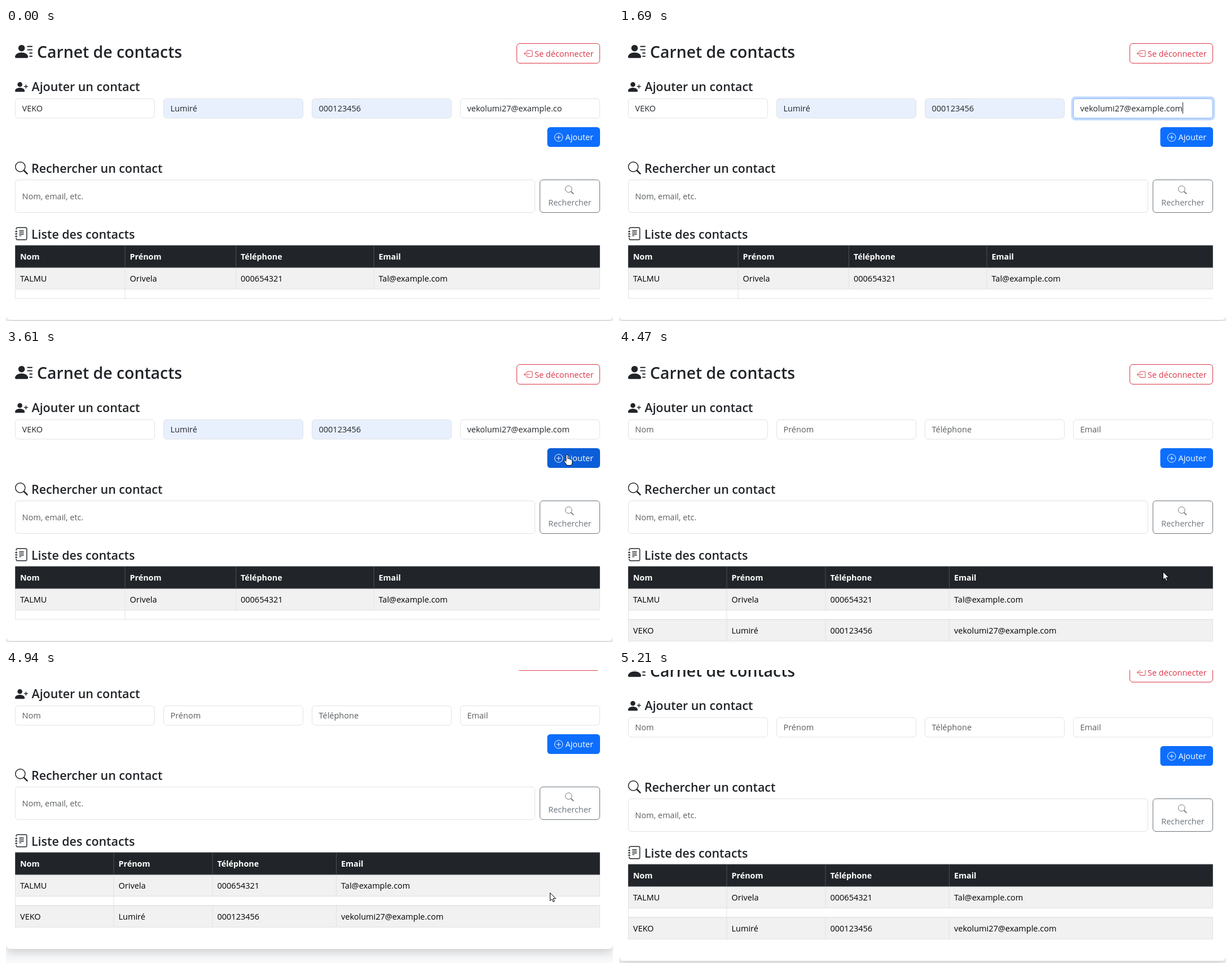
An HTML page that plays this animation: 1076x520 px, repeating every 6070 ms.

```html
<!DOCTYPE html>
<html lang="fr">
<head>
<meta charset="utf-8">
<title>Carnet de contacts</title>
<style>
html, body { margin: 0; width: 100%; height: 100%; overflow: hidden; background: #f8f9fa; }
#stage { position: relative; width: 100%; height: 100%; overflow: hidden; contain: strict; }
#page { position: absolute; left: 0; top: 0; width: 1076px; height: 520px; }
#card { position: absolute; left: 0; top: -20px; width: 1076px; background: #fff;
  border-radius: 0 0 8px 8px; box-shadow: 0 7.7px 15.4px rgba(0, 0, 0, .15); }
svg { position: absolute; left: 0; top: 0; }
#view { overflow: visible; }
text { font: 14.5px "Open Sans", "Noto Sans", sans-serif; fill: #212529; }
.h1 { font-size: 28.4px; font-weight: 600; }
.h2 { font-size: 21.4px; font-weight: 600; }
.th { font-size: 14.3px; font-weight: 700; fill: #fff; }
.td { fill: #000; }
.hint { fill: #595c5f; }
.box { fill: #fff; stroke: #dee2e6; }
.line { fill: none; stroke: currentColor; }
.cursor { stroke: #000; stroke-linejoin: round; fill: #fff; }
</style>
</head>
<body>
<div id="stage">
  <div id="page">
    <div id="card"></div>
    <svg id="view" width="1076" height="520"></svg>
  </div>
  <svg width="1076" height="520">
    <path id="arrow" class="cursor" d="M0 0v14l3.3-3 2.2 5 2.2-1-2.2-4.8h4.6z"/>
    <path id="hand" class="cursor" d="M-1.7 11V1.6a1.6 1.6 0 0 1 3.2 0V7q3-.6 3.2 1 2.3-.5 2.6 1 2-.3 2 1.8V14q0 3-2 5H0q-2-3.5-5-6.5-1-2 .8-2.2 1.3 0 2.5 1.7z"/>
    <path id="beam" class="cursor" style="fill:none" d="M-3.5 .5H-1l1 1 1-1h2.5M0 1.5v11M-3.5 13.5H-1l1-1 1 1h2.5"/>
  </svg>
</div>
<script>
const LOOP = 6070, ADDED = 3680;
const $ = id => document.getElementById(id);
const fieldX = [16.5, 279.5, 542.5, 805.5];
const labels = ['Nom', 'Prénom', 'Téléphone', 'Email'];
const first = ['TALMU', 'Orivela', '000654321', 'Tal@example.com'];
const second = ['VEKO', 'Lumiré', '000123456', 'vekolumi27@example.com'];

const glyphs = {
  person: '<path d="M6 8a3 3 0 1 0 0-6 3 3 0 0 0 0 6m-5 6s-1 0-1-1 1-4 6-4 6 3 6 4-1 1-1 1z"/>',
  lines: '<path class="line" stroke-linecap="round" d="M11.5 3.5h4m-4 3h4m-2 3h2m-2 3h2"/>',
  plus: '<path class="line" stroke-linecap="round" d="M13.5 5.5v4m-2-2h4"/>',
  search: '<circle class="line" cx="6.5" cy="6.5" r="6"/><path class="line" stroke-width="1.8" stroke-linecap="round" d="M11.3 11.3l3.7 3.7"/>',
  journal: '<path class="line" d="M1.5 3V2A1.5 1.5 0 0 1 3 .5h10A1.5 1.5 0 0 1 14.5 2v12a1.5 1.5 0 0 1-1.5 1.5H3A1.5 1.5 0 0 1 1.5 14v-1"/>' +
    '<path class="line" stroke-linecap="round" d="M.5 5.5h2m-2 3h2m-2 3h2M1.5 4.5v1m0 2v1m0 2v1M5.5 4.5h5m-5 2h5m-5 2h5m-5 2h2"/>',
  leave: '<path class="line" stroke-linecap="round" stroke-linejoin="round" d="M5.5 5.5v-2a1 1 0 0 1 1-1h8a1 1 0 0 1 1 1v9a1 1 0 0 1-1 1h-8a1 1 0 0 1-1-1v-2M10.5 8H.5M3.5 5l-3 3 3 3"/>',
  add: '<circle class="line" cx="8" cy="8" r="7.5"/><path class="line" stroke-linecap="round" d="M8 4.5v7M4.5 8h7"/>'
};
const icon = (names, x, y, size, color = '#212529') =>
  `<g transform="translate(${x} ${y}) scale(${size / 16})" style="color:${color}" fill="${color}">` +
  names.split(' ').map(n => glyphs[n]).join('') + '</g>';
const text = (x, y, s, attrs = '') => `<text x="${x}" y="${y}" ${attrs}>${s}</text>`;
const box = (x, y, w, h, attrs = 'class="box"') =>
  `<rect x="${x}" y="${y}" width="${w}" height="${h}" rx="5.5" ${attrs}/>`;

function fields(values) {
  return fieldX.map((x, i) => {
    const filled = values && (i === 1 || i === 2);
    const emailId = values && i === 3 ? 'id="email"' : '';
    return box(x, 125.5, 247, 34.5, `class="box" ${filled ? 'style="fill:#e8f0fe"' : ''}`) +
      text(x + 12, 148, (values || labels)[i], values ? emailId : 'class="hint"');
  }).join('');
}

function table(cols, rows) {
  const row = (y, cells) =>
    `<path d="M16.5 ${y}H1052.5v38.5H16.5z" fill="#f1f1f1" stroke="#dee2e6"/>` +
    cols.map((x, i) => (i ? `<path d="M${x} ${y}v38.5" stroke="#dee2e6"/>` : '') +
      text(x + 8.5, y + 25, cells[i], 'class="td"')).join('');
  return row(425, rows[0]) + (rows[1] ? row(480, rows[1]) : '') +
    `<path class="line" style="color:#dee2e6" d="M16.5 464v16M${cols[1]} 464v16M16 480H1053"/>` +
    '<path d="M16.5 386H1052.5V425H16.5z" fill="#212529" stroke="#4d5154"/>' +
    cols.map((x, i) => (i ? `<path d="M${x} 386v39" stroke="#4d5154"/>` : '') +
      text(x + 8.5, 411, labels[i], 'class="th"')).join('');
}

$('view').innerHTML =
  icon('person lines', 16, 26, 31) + text(55, 53, 'Carnet de contacts', 'class="h1"') +
  box(905.5, 27.5, 147, 35, 'fill="#fff" stroke="#dc3545"') +
  icon('leave', 918, 37.5, 15.4, '#dc3545') + text(937, 50.5, 'Se déconnecter', 'style="fill:#dc3545"') +
  icon('person plus', 16, 93, 23) + text(45.5, 112, 'Ajouter un contact', 'class="h2"') +
  icon('search', 16, 237, 23) + text(45, 257, 'Rechercher un contact', 'class="h2"') +
  icon('journal', 16, 353.5, 23) + text(45, 373.5, 'Liste des contacts', 'class="h2"') +
  box(16.5, 269.5, 921, 58) + text(28.5, 304, 'Nom, email, etc.', 'class="hint"') +
  box(946.5, 269.5, 106, 58, 'id="searchBox" stroke="#6c757d"') +
  `<g id="searchLabel">${icon('search', 991, 279.5, 15.6, 'currentColor')}` +
  text(999.5, 315, 'Rechercher', 'text-anchor="middle" style="fill:currentColor"') + '</g>' +
  box(959.5, 176, 93.5, 35, 'id="addBox"') +
  icon('add', 972, 186.3, 15.4, '#fff') + text(991.5, 199, 'Ajouter', 'style="fill:#fff"') +
  `<g id="before">${fields(second)}` +
  '<g id="focus">' + box(803.5, 123.5, 251, 38.5, 'fill="none" stroke="#0d6efd" stroke-opacity=".25" stroke-width="4"') +
  box(805.5, 125.5, 247, 34.5, 'fill="none" stroke="#86b7fe"') + '</g>' +
  '<path id="caret" stroke="#212529" d="M.5 132v20"/>' +
  table([16.5, 211, 407.5, 652], [first]) + '</g>' +
  `<g id="after">${fields(null)}${table([16.5, 191, 366, 585.5], [first, second])}</g>`;

// Pointer and scroll hold each pose until the next time.
const pointer = [
  [0], [70, 'hand', 1004, 300], [140, 'hand', 1001, 272], [200, 'arrow', 999, 235],
  [270, 'hand', 997, 195], [330, 'arrow', 996, 167], [400, 'beam', 995.5, 152], [460, 'beam', 995.5, 149.5],
  [1140], [2220, 'beam', 995.5, 149.5], [2420, 'beam', 995, 153], [2490, 'arrow', 994, 165],
  [2570, 'hand', 993, 177], [2640, 'hand', 993, 180], [2710, 'hand', 994, 183],
  [2780, 'hand', 994, 185], [2850, 'hand', 994.5, 187.5], [4200, 'hand', 992, 199],
  [4270, 'hand', 980, 275], [4330, 'arrow', 971, 335], [4400, 'arrow', 966, 375],
  [4470, 'arrow', 964.5, 395.5], [5140]
];
const scroll = [[0, 0], [4800, 22], [4870, 50], [4940, 62], [5010, 59], [5070, 52], [5140, 45], [5210, 41]];
const poseAt = (poses, t) => poses.filter(p => p[0] <= t).pop();
const clamp = v => Math.min(1, Math.max(0, v));
const fade = (t, on, off) => clamp((t - on) / 150) - clamp((t - off) / 150);
const within = (t, a, b) => t >= a && t < b;
const show = (id, on) => { $(id).style.display = on ? '' : 'none'; };
const mix = (a, b, k) => `rgb(${a.map((v, i) => Math.round(v + (b[i] - v) * k))})`;

function render(t) {
  const added = t >= ADDED;
  show('before', !added);
  show('after', added);
  $('card').style.height = (added ? 577 : 538) + 'px';
  $('page').style.transform = `translateY(${-poseAt(scroll, t)[1]}px)`;

  const typed = t >= 1690;
  const address = typed ? second[3] : second[3].slice(0, -1);
  if ($('email').textContent !== address) $('email').textContent = address;
  $('focus').style.opacity = fade(t, 930, 3120);
  const caretOn = within(t, 990, 1490) || within(t, 1690, 2220) || within(t, 2750, 3120);
  show('caret', caretOn);
  if (caretOn) {
    const end = 817.5 + $('email').getComputedTextLength();
    $('caret').setAttribute('transform', `translate(${Math.round(end)} 0)`);
  }

  const searchHover = fade(t, 70, 200) + fade(t, 4250, 4320);
  $('searchBox').setAttribute('fill', mix([255, 255, 255], [108, 117, 125], searchHover));
  $('searchLabel').style.color = mix([108, 117, 125], [255, 255, 255], searchHover);
  const addHover = fade(t, 270, 330) + fade(t, 2570, 4250) + .35 * fade(t, 3120, 3310);
  $('addBox').setAttribute('fill', mix([13, 110, 253], [11, 94, 215], addHover));

  const [, shape, x, y] = poseAt(pointer, t);
  for (const id of ['arrow', 'hand', 'beam']) show(id, id === shape);
  if (shape) $(shape).setAttribute('transform', `translate(${x} ${y})`);
}

function tick() {
  render(performance.now() % LOOP);
  requestAnimationFrame(tick);
}
tick();
</script>
</body>
</html>
```
